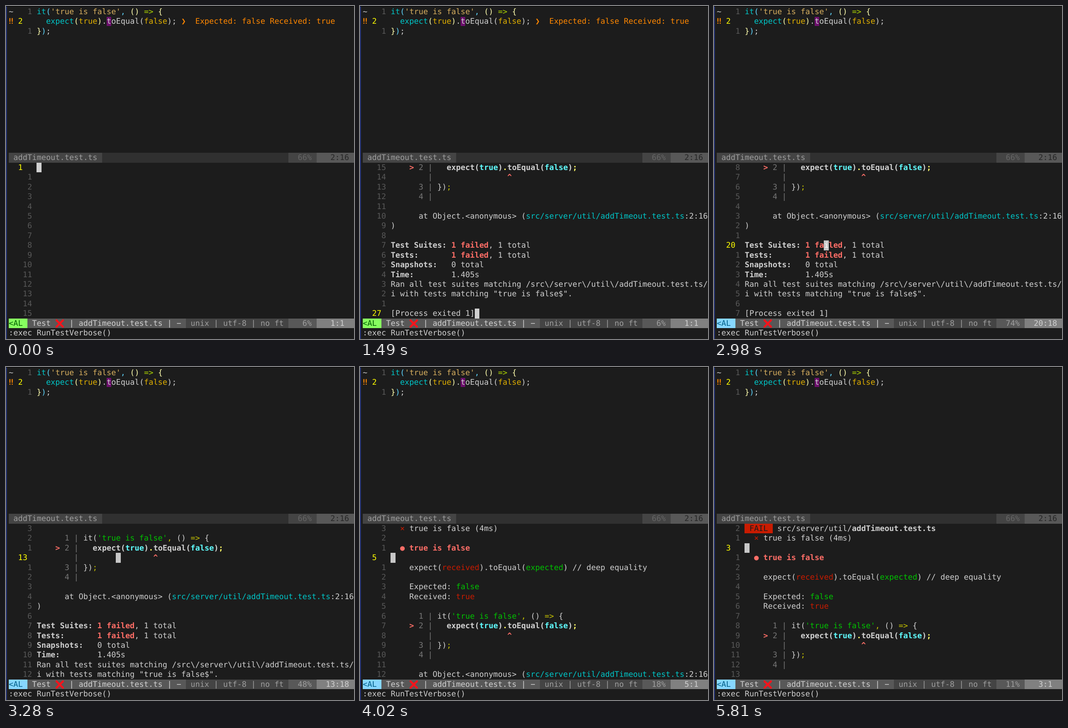
An HTML page for the animation above (7160 ms loop, 764 by 733 pixels).

```html
<!DOCTYPE html>
<html lang="en">
<head>
<meta charset="utf-8">
<title>Test run in a terminal editor</title>
<style>
  html, body { margin: 0; width: 100%; height: 100%; overflow: hidden; background: #1c1c1c; }
  #stage {
    position: relative; width: 764px; height: 733px; overflow: hidden;
    background: #1c1c1c; color: #d0d0d0;
    font: 17px/22px "DejaVu Sans Mono", "Liberation Mono", monospace;
    font-variant-ligatures: none; text-rendering: geometricPrecision;
  }
  #stage::before, #stage::after { content: ""; position: absolute; left: 0; top: 0; }
  #stage::before { width: 2px; height: 733px; background: #26357c; }
  #stage::after { width: 764px; height: 1px; background: #000; }
  .cell { position: absolute; height: 21.43px; white-space: pre; }
  i { font-style: normal; }
  b { font-weight: bold; }
  .num { color: #585858; }
  .here { color: #ff0; }
  .red { color: #c91b00; }
  .green { color: #00c200; }
  .yellow { color: #c7c400; }
  .cyan { color: #00c5c7; }
  .gray { color: #767676; }
  .hot { color: #ff6e67; }
  .sun { color: #fffc67; }
  .sky { color: #60fdff; }
  .str { color: #d7af5f; }
  .gold { color: #dfaf00; }
  .arrow { color: #afd700; }
  .p1 { color: #5fd7ff; }
  .p2 { color: #ffffaf; }
  .warn { color: #ff8700; }
  .mark { background: #6c0f6c; }
  .pair { background: #585858; }
  .fail, .runs { display: inline-block; height: 21.43px; color: #1c1c1c; }
  .fail { background: #c91b00; }
  .runs { background: #c7c400; }
  #cursor { width: 10.235px; color: #fff; }
  #cross, #beam { position: absolute; }
  #cross { left: 108px; top: 689px; }
</style>
</head>
<body>
<div id="stage"></div>
<script>
const CW = 10.235, RH = 21.43, LOOP = 7160, ROWS = 16, FIRST_ROW = 16;
const stage = document.getElementById('stage');

const paint = (cls, text) => `<i class="${cls}">${text}</i>`;
const bold = (text, cls = '') => `<b class="${cls}">${text}</b>`;

function place(el, row, col) {
  el.style.left = 6 + CW * col + 'px';
  el.style.top = 2 + RH * row + 'px';
}
function cell(row, col, html = '', cls = '') {
  const el = document.createElement('div');
  el.className = 'cell ' + cls;
  el.innerHTML = html;
  place(el, row, col);
  stage.append(el);
  return el;
}
function segment(row, from, to, bg, color, text) {
  const el = cell(row, from, text);
  el.style.width = to === 74 ? '764px' : CW * (to - from) + 'px';
  el.style.background = bg;
  el.style.color = color;
  return el;
}

// Upper window
cell(0, 0, '~');
cell(0, 4, '1', 'num');
cell(0, 6, paint('cyan', 'it') + paint('p1', '(') + paint('str', "'true is false'") + paint('p1', ',') +
  ' ' + paint('p2', '()') + ' ' + paint('arrow', '=&gt;') + ' ' + paint('p2', '{'));
cell(1, 0, bold('‼'), 'warn');
cell(1, 2, '2', 'here');
cell(1, 8, paint('cyan', 'expect') + paint('p2', '(') + paint('gold', 'true') + paint('p2', ')') + '.' +
  paint('mark', 't') + 'oEqual(' + paint('gold', 'false') + ');');
const hints = [cell(1, 37, '❯', 'warn'), cell(1, 40, 'Expected: false Received: true', 'warn')];
cell(2, 4, '1', 'num');
cell(2, 6, paint('p2', '}') + paint('p1', ')') + ';');

// Status lines
segment(15, 0, 20, '#444', '#9e9e9e', ' addTimeout.test.ts ');
segment(15, 20, 60, '#303030', '', '');
segment(15, 60, 66, '#444', '#666', '  66% ');
segment(15, 66, 74, '#585858', '#262626', '   2:16 ');
const mode = segment(32, 0, 4, '', '', '&lt;AL');
segment(32, 4, 38, '#585858', '#d0d0d0', ' Test    | addTimeout.test.ts | − ');
segment(32, 38, 60, '#444', '#9e9e9e', ' unix | utf-8 | no ft ');
const percent = segment(32, 60, 66, '#585858', '#9e9e9e', '');
const ruler = segment(32, 66, 74, '#808080', '#d0d0d0', '');
cell(33, 0, ':exec RunTestVerbose()');
stage.insertAdjacentHTML('beforeend',
  `<svg id="cross" width="20" height="20"><path d="M3 3L17 17M17 3L3 17" stroke="#f5141c" stroke-width="4.5" stroke-linecap="round"/></svg>
   <svg id="beam" width="8" height="15"><path d="M1 .5H6M3.5 .5V14.5M1 14.5H6" stroke="#aaa" fill="none"/></svg>`);
const beam = document.getElementById('beam');

// Lower window
const path = 'src/server/util/', file = 'addTimeout.test.ts';
const gutter = n => paint('gray', `      ${n} |`);
const total = label => bold(label.padEnd(13)) + bold('1 failed', 'hot') + ', 1 total';
const running = ['', paint('runs', ' RUNS ') + ' ' + path + bold(file)];
const report = [
  paint('fail', ' FAIL ') + ' ' + path + bold(file),
  `  ${paint('red', '×')} true is false (4ms)`,
  '',
  bold('  ● true is false', 'hot'),
  '',
  `    expect(${paint('red', 'received')}).toEqual(${paint('green', 'expected')}) // deep equality`,
  '',
  '    Expected: ' + paint('green', 'false'),
  '    Received: ' + paint('red', 'true'),
  '',
  `${gutter(1)} it(${paint('green', "'true is false'")}${paint('yellow', ',')} () ${paint('yellow', '=&gt;')} {`,
  `    ${bold('&gt;', 'hot')}${paint('gray', ' 2 |')}   ` + bold('expect(') + bold('true', 'sky') + bold(')') +
    bold('.', 'sun') + bold('toEqual(') + bold('false', 'sky') + bold(')') + bold(';', 'sun'),
  gutter(' ') + ' '.repeat(16) + bold('^', 'hot'),
  `${gutter(3)} })${paint('yellow', ';')}`,
  gutter(4),
  '',
  `      at Object.&lt;anonymous&gt; (${paint('cyan', path + file)}:2:16`,
  ')',
  '',
  total('Test Suites:'),
  total('Tests:'),
  bold('Snapshots:') + '   0 total',
  bold('Time:') + '        1.405s',
  'Ran all test suites matching /src\\/server\\/util\\/addTimeout.test.ts/',
  'i with tests matching "true is false$".',
  '',
  '[Process exited 1]'
];

const rows = Array.from({ length: ROWS }, (_, i) => ({
  num: cell(FIRST_ROW + i, 2),
  text: cell(FIRST_ROW + i, 6)
}));
const cursor = cell(FIRST_ROW, 6);
cursor.id = 'cursor';

// start time, cursor line, cursor column
const steps = [
  [0, 1, 1], [150, 3, 1], [1490, 27, 19], [2390, 27, 18], [2690, 26, 1],
  [2980, 20, 18], [3130, 17, 18], [3280, 13, 18], [3420, 10, 1], [3570, 7, 1],
  [3870, 6, 18], [4020, 5, 1], [4170, 4, 17], [4320, 3, 1]
];

function show(index) {
  const [, line, col] = steps[index];
  const lines = [[], running][index] || report;
  const normal = index > 2;
  const top = Math.max(1, Math.min(12, line - 3));

  rows.forEach(({ num, text }, i) => {
    const n = top + i, here = n === line;
    num.className = 'cell ' + (here ? 'here' : 'num');
    num.textContent = here ? n : String(Math.abs(n - line)).padStart(3);
    text.innerHTML = lines[n - 1] || '';
  });

  const under = rows[line - top].text;
  cursor.textContent = under.textContent[col - 1] || ' ';
  cursor.style.background = normal ? '#c7c7c7' : '#d0d0d0';
  place(cursor, FIRST_ROW + line - top, 5 + col);
  if (normal && line === 27) under.innerHTML = paint('pair', '[') + under.textContent.slice(1);

  const [l, c] = normal ? [line, col] : [1, 1];
  const share = normal ? Math.floor(line * 100 / report.length) : 6;
  percent.textContent = ' ' + String(share).padStart(3) + '% ';
  ruler.textContent = ' ' + String(l).padStart(3) + ':' + c;
  mode.style.background = normal ? '#87d7ff' : '#87ff5f';
  mode.style.color = normal ? '#005f87' : '#005f00';
}

let shown = -1;
function tick() {
  const t = performance.now() % LOOP;
  const index = steps.filter(([start]) => start <= t).length - 1;
  if (index !== shown) show(shown = index);
  hints.forEach(el => { el.style.visibility = t < 2540 ? 'visible' : 'hidden'; });
  const [x, y] = t < 5670 ? [653, 131] : [691, 371];
  beam.style.left = x + 'px';
  beam.style.top = y + 'px';
  beam.style.visibility = t >= 5520 && t < 5810 ? 'visible' : 'hidden';
  requestAnimationFrame(tick);
}
tick();
</script>
</body>
</html>
```
